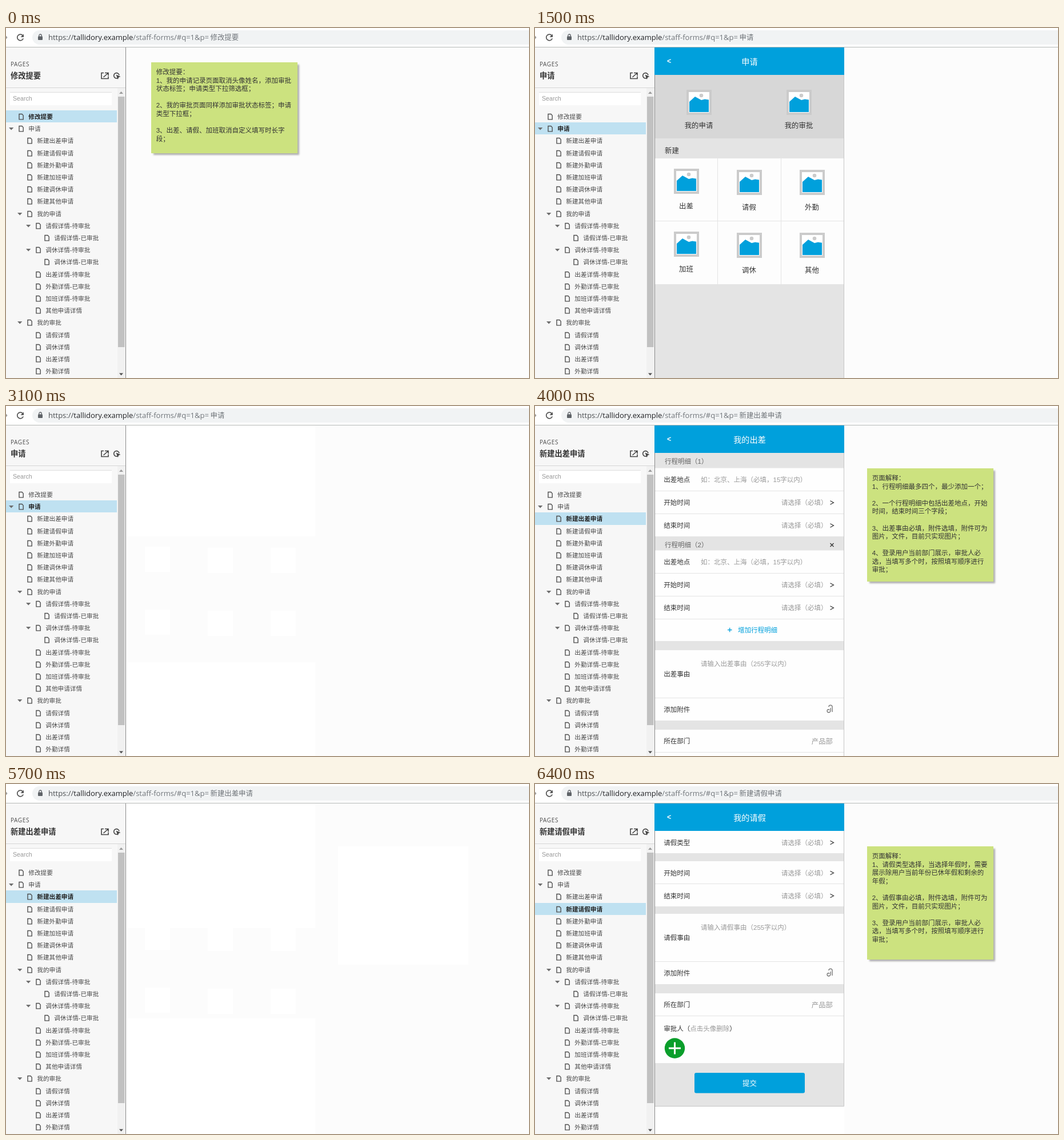
An HTML page that plays this animation: 915x612 px, repeating every 8000 ms.

```html
<!DOCTYPE html>
<html lang="zh-CN">
<head>
<meta charset="utf-8">
<title>申请</title>
<style>
  html, body { margin: 0; width: 100%; height: 100%; overflow: hidden; background: #fcfcfc; }
  svg { display: block; width: 915px; height: 612px; }
  text { font-family: "Liberation Sans", "Noto Sans CJK SC", "Noto Sans CJK", sans-serif; white-space: pre; }
  .url { font-family: "Open Sans", "Noto Sans CJK SC", "Noto Sans CJK", sans-serif; }
  .layer { animation: 8s step-end infinite; opacity: 0; }
  #status { animation-name: status; }
  @keyframes status {
    0% { opacity: 0 }
    42.5% { opacity: .5 }
    43.75% { opacity: 1 }
    47.5% { opacity: .67 }
    48.75% { opacity: .33 }
    50% { opacity: 0 }
    75% { opacity: 1 }
    78.75% { opacity: .5 }
    80%, 100% { opacity: 0 }
  }
</style>
</head>
<body>
<svg id="stage" viewBox="0 0 915 612"></svg>
<script>
const LOOP = 8000;
const BLUE = '#00a0dc', GRAY = '#e4e4e4', INK = '#333', HINT = '#999';
const css = [];

// Text is placed by the vertical centre of its line.
const text = (x, y, str, { size = 11.5, fill = INK, weight = 400, anchor = 'start', extra = '' } = {}) =>
  `<text x="${x}" y="${(y + size * .37).toFixed(2)}" font-size="${size}" fill="${fill}" font-weight="${weight}" text-anchor="${anchor}" ${extra}>${str}</text>`;
const rect = (x1, y1, x2, y2, fill, extra = '') =>
  `<rect x="${x1}" y="${y1}" width="${x2 - x1}" height="${y2 - y1}" fill="${fill}" ${extra}/>`;
const stroke = (d, color, width = 1) =>
  `<path d="${d}" fill="none" stroke="${color}" stroke-width="${width}"/>`;
const shape = (d, fill) => `<path d="${d}" fill="${fill}"/>`;

// Shows its content from one time to another, in ms.
function layer(from, to, content) {
  const name = `show${from}to${to}`;
  css.push(`@keyframes ${name} { 0% { opacity: 0 } ${from / LOOP * 100}% { opacity: 1 } ${to / LOOP * 100}%, 100% { opacity: 0 } }`);
  return `<g class="layer" style="animation-name: ${name}">${content}</g>`;
}

/* Browser bar and sidebar */

const toolbar = () =>
  rect(0, 0, 915, 33, '#fff') +
  rect(46, 4, 940, 29, '#f1f3f4', 'rx="12.5"') +
  rect(0, 33, 915, 34, '#b5b8b6') +
  shape('M0 13.5 2.5 16.5 0 19.5z', '#999') +
  stroke('M29.3 13A5.4 5.4 0 1 0 30.2 18.3', '#555', 1.7) +
  shape('M31 10.5V16H25.5z', '#555') +
  rect(56, 14.5, 64, 21, '#5f6368', 'rx="1"') +
  stroke('M57.8 15V13.2a2.2 2.2 0 0 1 4.4 0V15', '#5f6368', 1.3) +
  text(74, 16.5, '<tspan fill="#4a4d50">https:</tspan><tspan fill="#4a4d50">//</tspan><tspan fill="#202124">tallidory.example</tspan>/staff-forms/#q=1&amp;p=',
    { size: 13, fill: '#70757a', extra: 'class="url"' });

const tree = [
  [0, '修改提要'], [0, '申请', 1],
  ...['出差', '请假', '外勤', '加班', '调休', '其他'].map(kind => [1, `新建${kind}申请`]),
  [1, '我的申请', 1],
  [2, '请假详情-待审批', 1], [3, '请假详情-已审批'],
  [2, '调休详情-待审批', 1], [3, '调休详情-已审批'],
  [2, '出差详情-待审批'], [2, '外勤详情-已审批'], [2, '加班详情-待审批'], [2, '其他申请详情'],
  [1, '我的审批', 1],
  ...['请假', '调休', '出差', '外勤'].map(kind => [2, `${kind}详情`])
];
const rowY = i => 155 + 21.2 * i;

function treeRow([depth, label, open], i, selected) {
  const x = 22.5 + 15 * depth, y = Math.round(rowY(i));
  return (open ? shape(`M${x - 17.5} ${y - 2}h8.4l-4.2 4.6z`, '#6e6e6e') : '') +
    stroke(`M${x + .5} ${y - 4.5}h5l2.2 2.4v7h-7.2z`, '#4f4f4f', 1.4) +
    text(x + 16.8, y + .3, label, { size: 10.65, fill: selected ? '#222' : '#4a4a4a', weight: selected ? 700 : 400 });
}

const sidebar = () =>
  rect(0, 34, 209, 612, '#f7f7f7') +
  rect(209, 34, 210, 612, '#8a8a8a') +
  text(8, 63, 'PAGES', { size: 10, fill: '#4a4a4a', extra: 'class="url" letter-spacing=".6"' }) +
  stroke('M171 78.5h-4v10h12v-4M173 78.5h6v5M179 78.5 170.5 86', '#444', 1.6) +
  stroke('M195.5 87.5A4.7 4.7 0 1 1 198 82.5', '#444', 1.6) +
  shape('M192.5 81.5 200.5 85 197.2 86.3 195.8 90z', '#444') +
  rect(0, 104, 209, 105, '#d6d6d6') +
  rect(7, 112, 185, 135, '#fff') + rect(7, 112, 185, 113, '#dedede') +
  text(12, 123.5, 'Search', { size: 10.65, fill: HINT }) +
  rect(195, 105, 209, 612, '#f1f1f1') +
  rect(196, 120, 207.5, 558, '#c1c1c1') +
  shape('M198 115h7l-3.5-4z', '#9a9a9a') + shape('M198 603.5h7l-3.5 4z', '#505050');

const selection = index => {
  const title = tree[index][1], y = rowY(index);
  return text(357.5, 16.5, title, { size: 12.4, fill: '#70757a' }) +
    text(8, 83.5, title, { size: 13.25, fill: INK, weight: 700 }) +
    rect(0, Math.round(y - 11), 194, Math.round(y + 10.2), '#bfe1f1') +
    tree.map((row, i) => treeRow(row, i, i === index)).join('');
};

/* Page parts */

const note = (x1, y1, x2, y2, top, lines) =>
  rect(x1 + 4, y1 + 4, x2 + 3, y2 + 3, '#000', 'opacity=".3" filter="url(#soft)"') +
  rect(x1, y1, x2, y2, '#cce27f') +
  lines.map((line, i) => text(x1 + 8.7, top + 14.55 * i, line)).join('');

const frame = (bottom, title, content) =>
  rect(210, 34, 541, 612, '#fff') +
  rect(210, 82, 541, bottom, GRAY) + content +
  stroke(`M540.5 82V${bottom}${bottom < 612 ? 'H210' : ''}`, '#c6c6c6') +
  rect(209, 34, 541, 82, BLUE) +
  text(231, 57.5, '&lt;', { size: 12.4, fill: '#fff', weight: 700 }) +
  text(375.5, 58.5, title, { size: 14.15, fill: '#fff', anchor: 'middle' });

const line = y => rect(210, y, 541, y + 1, GRAY);
const panel = (y1, y2) => rect(210, y1, 541, y2, '#fefefe');
const label = (y, str) => text(225.3, y, str);
const hint = (y, str) => text(290, y, str, { fill: HINT });
const select = (y, str) =>
  label(y, str) + text(431, y, '请选择（必填）', { fill: HINT }) + stroke(`M516.5 ${y - 3.2}l6 3.2-6 3.2`, INK, 1.2);

const picture = (x, y) => `<g transform="translate(${x} ${y})">` +
  rect(0, 0, 44, 44, '#cbcbcb') + rect(4, 4, 40, 40, '#fff') +
  '<circle cx="26" cy="10" r="3.3" fill="#cbcbcb"/>' +
  shape('M5 21 15 12 26 18 32 16.5 39 17.5V39H5z', BLUE) + '</g>';
const tile = (x, y, str, gap) => picture(x, y) +
  text(x + 21.5, y + gap, str, { size: 12.4, anchor: 'middle' });
const tileSpots = [[243, 246], [353, 248], [463, 248], [243, 356], [353, 358], [463, 358]];

const reasonAndFile = (y, kind) =>
  panel(y, y + 123) + hint(y + 24, `请输入${kind}事由（255字以内）`) + label(y + 41.5, `${kind}事由`) +
  line(y + 83) + label(y + 104, '添加附件') +
  stroke(`M514 ${y + 99}c0-4 6-4 6 0v9M517 ${y + 101}v4c0 5-6 5-6 1 0-3 4-3 4-1`, '#555', 1.1) +
  panel(y + 139, y + 178) + label(y + 159, '所在部门') +
  text(521, y + 159.5, '产品部', { size: 12.4, fill: HINT, anchor: 'end' }) + line(y + 178);

const trip = y =>
  panel(y, y + 120) + label(y + 20.5, '出差地点') + hint(y + 20.5, '如：北京、上海（必填，15字以内）') + line(y + 39.5) +
  select(y + 60.5, '开始时间') + line(y + 79.5) + select(y + 100.5, '结束时间') + line(y + 119.5);

/* Pages */

const summaryPage = () => note(254, 60, 510, 219, 77, [
  '修改提要：',
  '1、我的申请记录页面取消头像姓名，添加审批', '状态标签；申请类型下拉筛选框；', '',
  '2、我的审批页面同样添加审批状态标签；申请', '类型下拉框；', '',
  '3、出差、请假、加班取消自定义填写时长字', '段；'
]);

const menuPage = () => frame(612, '申请',
  rect(210, 82, 541, 193, '#d7d7d7') +
  tile(265, 108, '我的申请', 62) + tile(440, 108, '我的审批', 62) +
  text(227, 214, '新建', { size: 12.4 }) +
  rect(210, 228, 541, 448, '#fdfdfd') +
  stroke('M319.5 228V448M430.5 228V448M210 337.5H541', GRAY) +
  ['出差', '请假', '外勤', '加班', '调休', '其他'].map((kind, i) => tile(...tileSpots[i], kind, 65)).join(''));

const tripPage = () => frame(612, '我的出差',
  text(227, 97, '行程明细（1）', { fill: '#666' }) + trip(108.5) +
  text(227, 242.5, '行程明细（2）', { fill: '#666' }) + stroke('M516.5 240l6 6m0-6-6 6', INK, 1.3) + trip(252.5) +
  panel(373, 411) + stroke('M337 391.5h7.5M340.7 387.7v7.5', BLUE, 1.3) + text(355, 392, '增加行程明细', { fill: BLUE }) +
  reasonAndFile(427, '出差') + panel(606, 612)) +
  note(581, 109, 802, 307, 126, [
    '页面解释：',
    '1、行程明细最多四个，最少添加一个；', '',
    '2、一个行程明细中包括出差地点，开始', '时间，结束时间三个字段；', '',
    '3、出差事由必填，附件选填，附件可为', '图片，文件，目前只实现图片；', '',
    '4、登录用户当前部门展示，审批人必', '选，当填写多个时，按照填写顺序进行', '审批；'
  ]);

const leavePage = () => frame(563.5, '我的请假',
  panel(82, 121) + select(102.5, '请假类型') +
  panel(135, 214) + select(155.5, '开始时间') + line(174) + select(195.5, '结束时间') +
  reasonAndFile(227, '请假') +
  panel(406, 488) + label(427.5, `审批人（<tspan fill="${HINT}">点击头像删除</tspan>）`) +
  '<circle cx="244.5" cy="462" r="17.7" fill="#0a9e2b"/>' + stroke('M234 462h21M244.5 451.5v21', '#fff', 3) +
  rect(279, 505, 472, 540.5, BLUE, 'rx="3"') +
  text(375.5, 523, '提交', { size: 12.4, fill: '#fff', anchor: 'middle' })) +
  note(581, 109, 802, 307, 126, [
    '页面解释：',
    '1、请假类型选择，当选择年假时，需要', '展示除用户当前年份已休年假和剩余的', '年假；', '',
    '2、请假事由必填，附件选填，附件可为', '图片，文件，目前只实现图片；', '',
    '3、登录用户当前部门展示，审批人必', '选，当填写多个时，按照填写顺序进行', '审批；'
  ]);

const blankFrame = (top, bottom) =>
  rect(210, 34, 541, 612, '#fff') + rect(211, top, 541, bottom, '#fcfcfc') +
  tileSpots.map(([x, y]) => rect(x, Math.max(y, top), x + 44, y + 44, '#fff')).join('');

const status = () => '<g id="status" class="layer">' +
  '<path d="M-1 594.5H343.5q3 0 3 3V613H-1z" fill="#f2f2f2" stroke="#c4c4c4"/>' +
  text(5, 604, '正在等待 tallidory.example 的响应…', { size: 10.65, fill: '#666' }) + '</g>';

document.getElementById('stage').innerHTML =
  '<defs><filter id="soft"><feGaussianBlur stdDeviation="1.5"/></filter></defs>' +
  rect(0, 0, 915, 612, '#fcfcfc') + toolbar() + sidebar() +
  layer(0, 1500, selection(0)) +
  layer(1500, 3400, selection(1)) +
  layer(3400, 6000, selection(2)) +
  layer(6000, 8000, selection(3)) +
  layer(0, 1400, summaryPage()) +
  layer(1400, 1500, rect(254, 60, 519, 228, '#fff')) +
  layer(1500, 3100, menuPage()) +
  layer(3100, 3400, blankFrame(228, 448)) +
  layer(3400, 5700, tripPage()) +
  layer(5700, 6000, blankFrame(252, 410) + rect(581, 109, 809, 316, '#fff')) +
  layer(6000, 8000, leavePage()) +
  status();
document.head.insertAdjacentHTML('beforeend', `<style>${css.join('\n')}</style>`);
</script>
</body>
</html>
```
